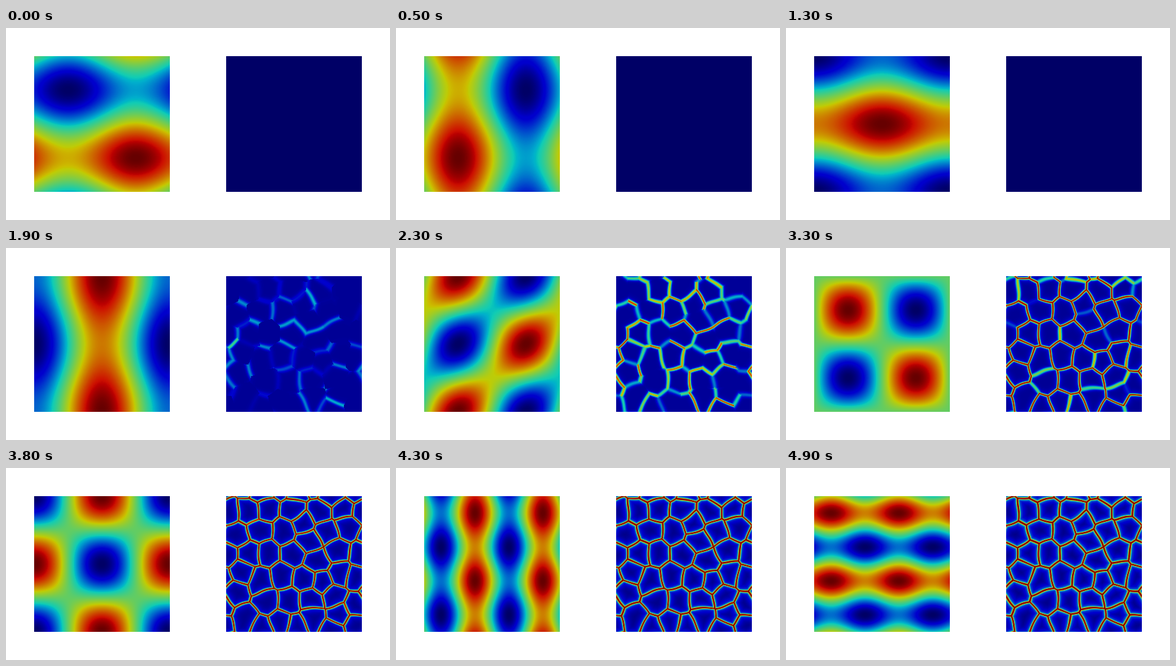
Animation of 600 by 300 pixels, one loop 5 s. Source, as a matplotlib script:

```python
import numpy as np
import matplotlib.pyplot as plt
from matplotlib.animation import FuncAnimation

W, H, SIZE = 600, 300, 212
LEFT, RIGHT, TOP = 44, 344, 44
FRAMES, INTERVAL = 50, 100
CELLS = 40

# First cells of the network; the others fill the gaps between them.
KEY_CELLS = [(380, 68), (408, 63), (489, 70), (360, 105), (434, 101),
             (502, 99), (533, 92), (380, 133), (411, 131), (473, 113),
             (519, 129), (367, 163), (432, 167), (466, 174), (520, 165),
             (359, 192), (409, 209), (513, 201), (440, 208), (428, 241)]
SPARK = (363, 135)  # the network starts here

pixel = np.arange(SIZE) + 0.5
X, Y = np.meshgrid(pixel, pixel)


def wrap(delta):
    return (delta + SIZE / 2) % SIZE - SIZE / 2


def distance2(point):
    return wrap(X - point[0]) ** 2 + wrap(Y - point[1]) ** 2


def smooth(x):
    x = np.clip(x, 0, 1)
    return x * x * (3 - 2 * x)


def grow_cells():
    """Put each new cell in the widest gap, in the family of its neighbour."""
    cells = [np.subtract(p, (RIGHT, TOP)) for p in KEY_CELLS]
    family = list(range(len(cells)))
    while len(cells) < CELLS:
        gaps = np.array([distance2(c) for c in cells])
        row, col = np.unravel_index(gaps.min(0).argmax(), X.shape)
        family.append(family[gaps[:, row, col].argmin()])
        cells.append(np.array([pixel[col], pixel[row]]))
    return np.array(cells, float), np.array(family)


def wall_births(cells, family):
    spread = np.triu(np.random.default_rng(4).random((CELLS, CELLS)), 1)
    spread += spread.T
    middle = cells[:, None] + wrap(cells[None] - cells[:, None]) / 2
    away = wrap(middle - np.subtract(SPARK, (RIGHT, TOP)))
    lead = 400 * np.exp(-(away ** 2).sum(-1) / 300)
    late = family[:, None] == family[None]
    return np.where(late, 2650, 1550) + 450 * spread - np.where(late, 0, lead)


def wall_field(neighbours=7):
    """Distance to the nearest walls, and when each wall starts."""
    cells, family = grow_cells()
    k = 2 * np.pi / SIZE
    bent = np.stack([X + 1.3 * np.sin(k * (4 * Y + 2 * X)),
                     Y + 1.3 * np.sin(k * (4 * X - 3 * Y) + 1)], -1)
    offset = wrap(cells - bent[:, :, None])
    dist2 = (offset ** 2).sum(-1)
    order = np.argsort(dist2, axis=-1)[..., :neighbours + 1]
    near = np.take_along_axis(dist2, order, -1)
    pos = np.take_along_axis(offset, order[..., None], 2)
    gap = np.linalg.norm(pos[:, :, 1:] - pos[:, :, :1], axis=-1)
    distance = (near[..., 1:] - near[..., :1]) / (2 * gap)
    births = wall_births(cells, family)
    return distance, births[order[..., :1], order[..., 1:]]


distance, births = wall_field()


def network(t):
    grown = smooth((t - births) / 850)
    aged = smooth((t - 2700) / 2200)
    width = 1.7 + 3 * (1 - grown)
    walls = grown * (0.75 * np.exp(-(distance / width) ** 2)
                     + (0.17 + 0.17 * aged)
                     * np.exp(-distance / (3 + 3 * aged)))
    base = (0.055 - 0.03 * aged) * smooth((t - 1150) / 800)
    return np.minimum(base + walls.max(-1), 0.98)


U, V = 2 * np.pi * X / SIZE, 2 * np.pi * Y / SIZE
sin, cos = np.sin, np.cos


def mix(share, first, second):
    return share * first + (1 - abs(share)) * second


# Waves on a periodic square, from the longest to shorter ones.
MODES = [
    mix(-0.32, sin(U), -sin(V)),
    mix(0.68, sin(U), -sin(V)),
    mix(-0.25, cos(U), -cos(V)),
    mix(-0.75, cos(U), cos(V)),
    sin(U) * cos(V) + 0.27 * cos(U) * sin(V),
    cos(U) * sin(V) - 0.27 * sin(U) * cos(V),
    sin(U) * sin(V),
    -cos(U) * cos(V),
    mix(-0.74, sin(2 * U), sin(2 * V)),
    mix(0.26, sin(2 * U), sin(2 * V)),
]


def shade(values):
    return 0.8 * plt.cm.jet(values)[..., :3]


def picture(frame):
    step = frame - (frame + 3) // 5  # one frame in five is held
    canvas = np.ones((H, W, 3))
    rows = slice(TOP, TOP + SIZE)
    canvas[rows, LEFT:LEFT + SIZE] = shade(0.5 + 0.5 * MODES[step // 4])
    canvas[rows, RIGHT:RIGHT + SIZE] = shade(network(125 * step))
    return canvas


fig = plt.figure(figsize=(W / 100, H / 100), dpi=100, facecolor="white")
ax = fig.add_axes([0, 0, 1, 1])
ax.axis("off")
image = ax.imshow(picture(0), interpolation="none", aspect="auto")


def update(frame):
    image.set_data(picture(frame))
    return [image]


anim = FuncAnimation(fig, update, frames=FRAMES, interval=INTERVAL,
                     repeat=True, repeat_delay=0, blit=False)
plt.show()
```
